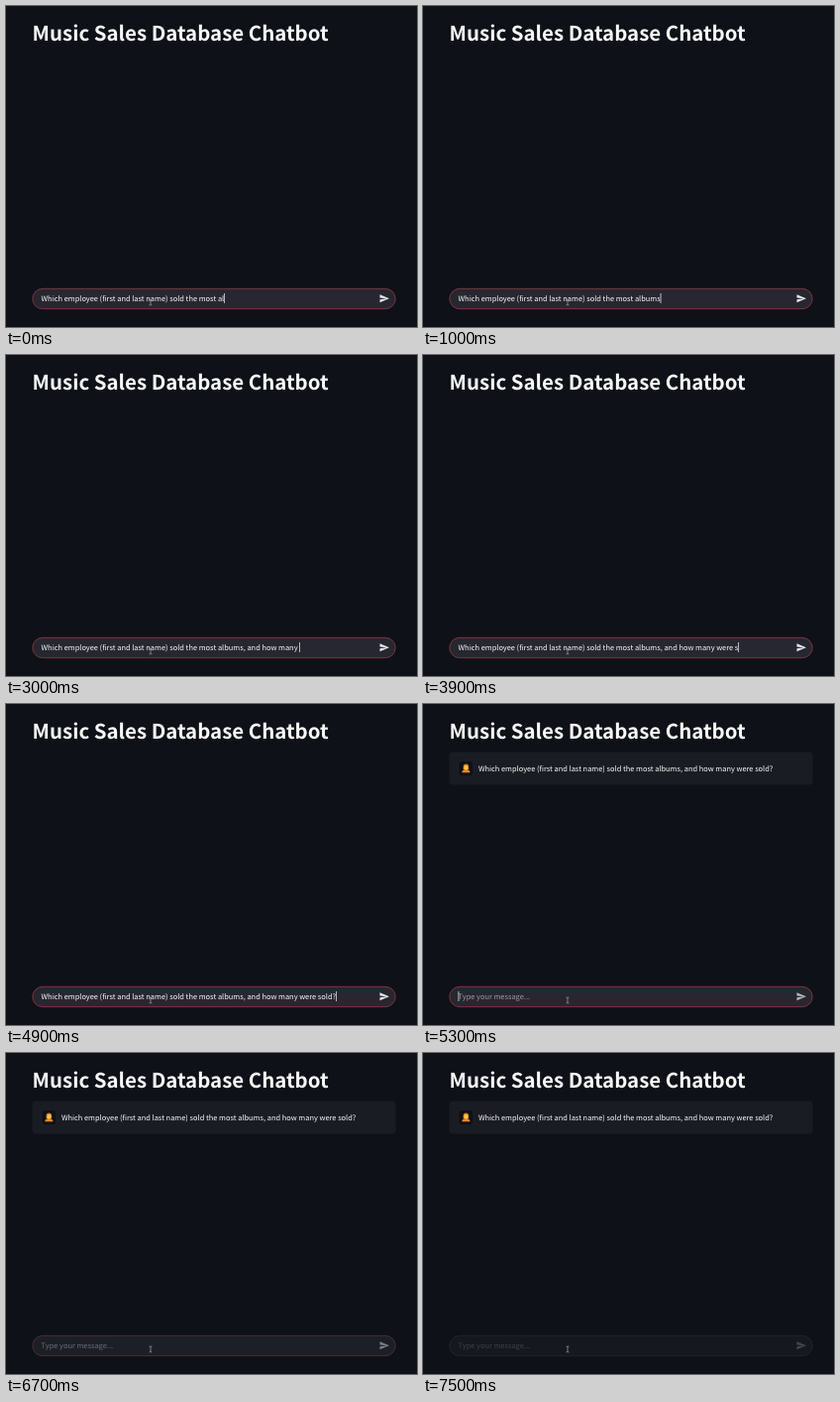
Write an HTML page that moves like this. It is 415 by 324 pixels and loops after 8000 ms.

```html
<!DOCTYPE html>
<html lang="en">
<head>
<meta charset="utf-8">
<title>Chatbot</title>
<style>
html, body { margin: 0; width: 100%; height: 100%; overflow: hidden; background: #0e1117; }
svg { display: block; width: 415px; height: 324px; }
text {
  font-family: "Noto Sans CJK JP", "Noto Sans CJK SC", "Noto Sans CJK", "Noto Sans", sans-serif;
  font-size: 7.44px; fill: #fafafa; white-space: pre; text-rendering: geometricPrecision;
}
#title { font-size: 20.46px; font-weight: 700; }
</style>
</head>
<body>
<svg viewBox="0 0 415 324">
  <rect width="415" height="324" fill="#0e1117"/>
  <text id="title" x="26.6" y="34.6">Music Sales Database Chatbot</text>
  <g id="message">
    <rect x="26.5" y="48.5" width="367" height="33" rx="4" fill="#1a1c24"/>
    <rect x="35.8" y="57.3" width="15" height="15.6" rx="3.5" fill="#0e1117" stroke="#2a2c35" stroke-width=".5"/>
    <path d="M39.2 69.2 Q39.4 66.2 43.4 66.2 Q47.4 66.2 47.6 69.2 Z" fill="#e8862e"/>
    <path d="M40.6 66.6 V63.4 a2.8 2.8 0 0 1 5.6 0 V66.6 Z" fill="#d9752b"/>
    <ellipse cx="43.4" cy="64.2" rx="2" ry="2.5" fill="#fcc93c"/>
    <text id="question" x="55.9" y="68"></text>
  </g>
  <g id="form">
    <rect id="box" x="26.8" y="285.3" width="366.4" height="20.4" rx="10.2" fill="#262730" stroke-width=".7"/>
    <text id="typed" x="35.6" y="298.1"></text>
    <rect id="caret" y="290" width=".7" height="10" fill="#fafafa"/>
    <path id="send" transform="translate(376.6 289.9) scale(.45)" d="M2 21 23 12 2 3V10L17 12 2 14Z"/>
  </g>
  <path d="M144.6 296 q1.4 0 1.4 .8 q0 -.8 1.4 -.8 M146 296.8 V301.2 M144.6 302 q1.4 0 1.4 -.8 q0 .8 1.4 .8" fill="none" stroke="#a9aab0" stroke-width=".7"/>
</svg>
<script>
const LOOP = 8000, SENT = 5100, FADE = 5700, FADED = 7200;
const question = "Which employee (first and last name) sold the most albums, and how many were sold?";
const typedAtStart = question.indexOf("bums");
// Time of each further keystroke, in ms
const keys = [
  200, 400, 700, 900, 1300, 1400,
  1500, 1600, 1700, 1800,
  2000, 2050, 2100, 2200,
  2400, 2500, 2700, 2900, 3000,
  3300, 3500, 3700, 3800, 3850,
  3900, 4000, 4100, 4300, 4800
];
const $ = id => document.getElementById(id);
const typed = $("typed"), caret = $("caret"), box = $("box"), send = $("send");
let shown = null;

$("question").textContent = question;

function setText(str) {
  if (str === shown) return;
  shown = str;
  typed.textContent = str;
}

function draw(t) {
  const sent = t >= SENT;
  const count = typedAtStart + keys.filter(k => k <= t).length;
  setText(sent ? "Type your message..." : question.slice(0, count));
  typed.setAttribute("fill-opacity", sent ? 0.55 : 1);

  const x = sent || !count ? 35.6 : 35.6 + typed.getSubStringLength(0, count);
  caret.setAttribute("x", x);
  caret.setAttribute("opacity", !sent || t % 1000 < 500 ? 1 : 0);

  const p = Math.min(1, Math.max(0, (t - FADE) / (FADED - FADE)));
  const ease = Math.pow(p, 1.7);
  $("form").setAttribute("opacity", 1 - 0.67 * ease);
  const mix = (a, b) => Math.round(a + (b - a) * ease);
  box.setAttribute("stroke", `rgb(${mix(168, 112)},${mix(62, 82)},${mix(72, 92)})`);
  send.setAttribute("fill", sent ? "#b4b5b9" : "#e6e6e9");
  $("message").setAttribute("visibility", sent ? "visible" : "hidden");
}

function tick(now) {
  draw(now % LOOP);
  requestAnimationFrame(tick);
}
draw(0);
requestAnimationFrame(tick);
</script>
</body>
</html>
```
